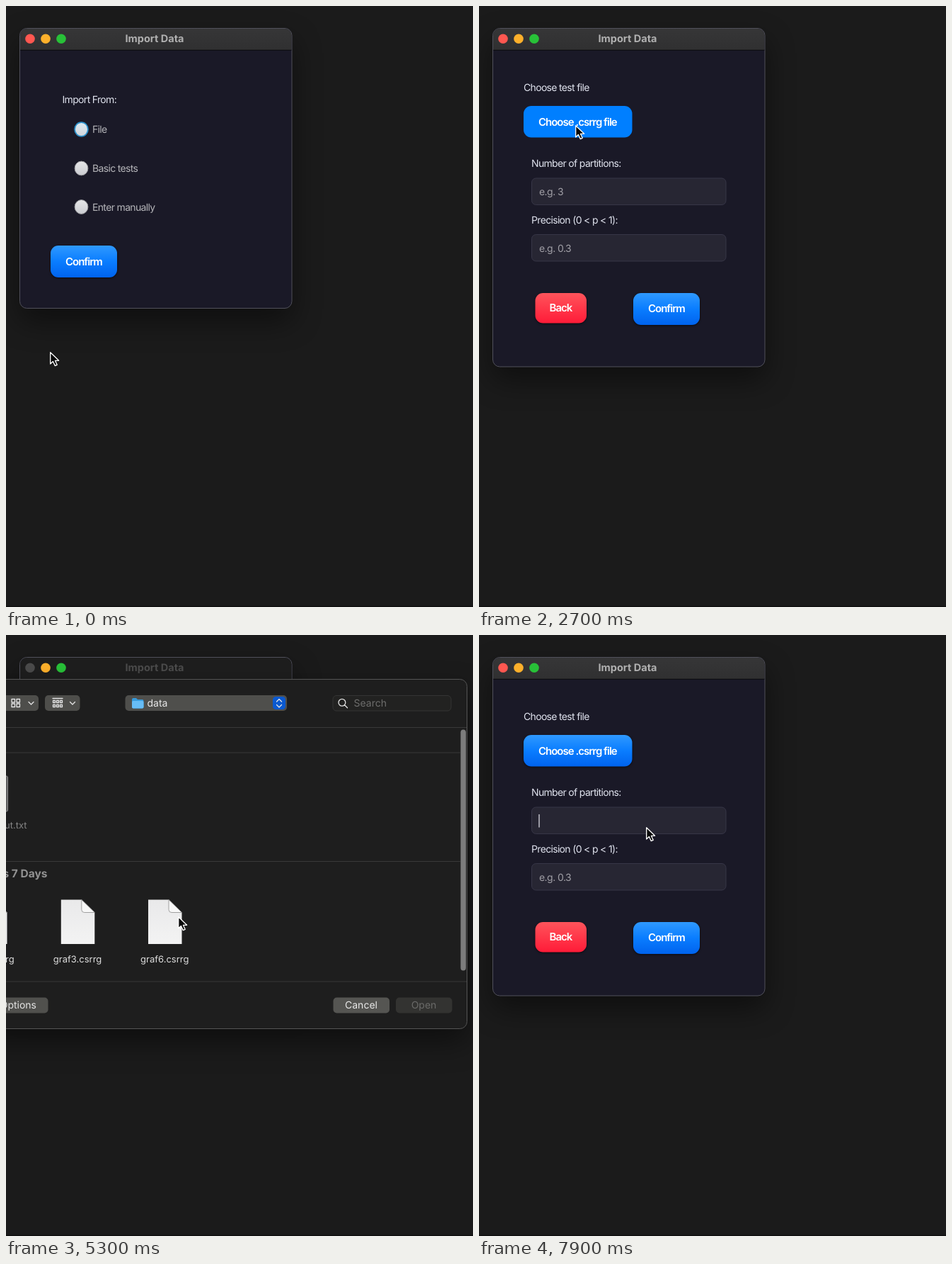
Recreate the animation shown at these times as an HTML page. Size 660 by 848 pixels, loop 8 s.

```html
<!DOCTYPE html>
<html lang="en">
<head>
<meta charset="utf-8">
<title>Import Data</title>
<style>
  html, body { margin: 0; width: 100%; height: 100%; overflow: hidden; background: #1b1b1b; }
  svg { display: block; width: 660px; height: 848px; }
  text { font: 14px Inter, "Open Sans", sans-serif; text-rendering: geometricPrecision; }
  .title { font-weight: 700; font-size: 14.5px; }
  .label { fill: #e0e3ee; letter-spacing: -.67px; }
  .option, .hint { fill: #b4b4b8; letter-spacing: -.66px; }
  .hint { fill: #a09fa6; letter-spacing: -.55px; }
  .btn { fill: #fff; font-weight: 600; font-size: 15px; letter-spacing: -1px; }
  .file { font-size: 13px; fill: #dedede; }
  .end { text-anchor: end; }
  .mid { text-anchor: middle; }
  .section { font-weight: 700; font-size: 15.5px; fill: #929292; }
  .line { stroke: #393939; }
  .icon { fill: none; stroke: #e4e4e4; stroke-width: 1.3; stroke-linecap: round; stroke-linejoin: round; }
  .shadow { filter: drop-shadow(0 1px 1.5px rgba(0,0,0,.6)); }
  .deep { filter: drop-shadow(0 18px 20px rgba(0,0,0,.45)); }
</style>
</head>
<body>
<svg id="stage" viewBox="0 0 660 848"></svg>
<script>
const stage = document.getElementById('stage');
const rect = (x, y, w, h, r, fill, more = '') =>
  `<rect x="${x}" y="${y}" width="${w}" height="${h}" rx="${r}" fill="${fill}" ${more}/>`;
const text = (x, y, s, cls = '', fill = '') =>
  `<text x="${x}" y="${y}" class="${cls}" ${fill && `style="fill:${fill}"`}>${s}</text>`;
const circle = (x, y, r, fill, more = '') => `<circle cx="${x}" cy="${y}" r="${r}" fill="${fill}" ${more}/>`;
const icon = d => `<path class="icon" d="${d}"/>`;
const gradient = (id, ...stops) => `<linearGradient id="${id}" x2="0" y2="1">${stops.map((c, i) =>
  `<stop offset="${i / (stops.length - 1)}" stop-color="${c}"/>`).join('')}</linearGradient>`;
const group = (id, body) => `<g id="${id}">${body}</g>`;

const button = (x, y, w, h, s, tx, ty, fill = 'blue', id = '') =>
  rect(x, y, w, h, 11, `url(#${fill})`, `class="shadow" ${id && `id="${id}"`}`) + text(tx, ty, s, 'btn');
const radio = (y, s, focus) =>
  `<ellipse cx="106.5" cy="${y}" rx="9.4" ry="9.9" fill="url(#${focus ? 'focus' : 'knob'})" stroke="${focus ? '#2b8fc9' : '#98989c'}" stroke-width="${focus ? 1.8 : 1}"/>` +
  text(122, y + 5, s, 'option');
const field = y => rect(74.5, y, 274.5, 37.5, 6, '#272633', 'stroke="#373647"');
const page = (x, y, s) =>
  `<path d="M${x} ${y}h29l18.500 18v44.500h-47.500z" fill="url(#paper)"/>` +
  `<path d="M${x + 29} ${y}v14q0 4 4 4h14.500z" fill="#f8f8f8" stroke="#8c8c8c" stroke-width=".8"/>` +
  text(x + 23.3, y + 88, s, 'file mid');
const chevron = x => icon(`M${x - 3.500} 94.500l3.500 3.500 3.500-3.500`);

const frame = `
  ${rect(19.5, 31.5, 384.5, 395, 10, '#1a1927', 'id="body" class="deep" stroke="#50505a"')}
  <path id="bar" d="M20 62V41.500a9.500 9.500 0 0 1 9.500-9.500H394a9.500 9.500 0 0 1 9.500 9.500V62z" fill="url(#chrome)"/>
  <path d="M20 62.300H403.500" stroke="#0b0b0d"/>
  ${circle(34, 46.3, 6.8, '#ff5750', 'id="red"')}
  ${circle(56, 46.3, 6.8, '#fdb02b')}
  ${circle(78, 46.3, 6.8, '#28c138')}
  <g id="caption">${text(168.5, 50.8, 'Import Data', 'title')}</g>`;

const source = text(79.5, 137, 'Import From:', 'label') +
  radio(174, 'File', true) + circle(106.5, 174, 3.8, '#303034', 'id="dot"') +
  radio(229, 'Basic tests') + radio(283.5, 'Enter manually') +
  button(63, 338, 94, 45, 'Confirm', 84, 365.7, 'blue', 'confirm');

const form = text(63, 120.3, 'Choose test file', 'label') +
  button(63, 141, 153.5, 44.5, 'Choose .csrrg file', 84, 168.8, 'blue', 'choose') +
  text(74, 227.3, 'Number of partitions:', 'label') + field(243) +
  group('hint', text(85, 267, 'e.g. 3', 'hint')) +
  `<path id="caret" d="M85 253V271.500" stroke="#e8e8ee" stroke-width="1.2"/>` +
  text(74, 306.7, 'Precision (0 &lt; p &lt; 1):', 'label') + field(322.5) +
  text(85, 346.5, 'e.g. 0.3', 'hint') +
  button(79.5, 405, 72.5, 42.5, 'Back', 99.5, 431, 'danger') +
  button(218, 405, 94, 45, 'Confirm', 239, 432.4);

const squares = [8, 15].map(x => [90.5, 97].map(y => `M${x} ${y}h4.500v4.500h-4.500z`).join('')).join('');
const cells = [66.5, 71.5, 76.5].map(x => [92.5, 98.5].map(y => `M${x} ${y}h3v3h-3z`).join('')).join('');

const dialog = `
  ${rect(-120, 62.5, 771.5, 493, 10, '#1e1e1e', 'class="deep" stroke="#555"')}
  <path class="line" d="M0 130.500H651M0 166H642M0 319.500H642M0 489H651"/>
  ${rect(-20, 85, 66, 22, 5, '#4e4e4b')}${icon(squares)}${chevron(35.5)}
  ${rect(55, 85, 49.5, 22, 5, '#4e4e4b')}${icon('M66 89.500h14' + cells)}${chevron(94)}
  ${rect(168.5, 85, 228.5, 22, 5, '#4f4f4c')}
  <path d="M178 91q0-2 2-2h4l2 2h6.500q2 0 2 2v8.500q0 2-2 2h-12.500q-2 0-2-2z" fill="#379bdc"/>
  ${rect(178, 93, 16.5, 10.5, 1.8, '#67bdf6')}
  ${text(199.5, 100.7, 'data', '', '#e8e8e8')}
  ${rect(377, 87, 18, 18, 4.5, '#0b59d0')}${icon('M382.500 94l3.500-3.500 3.500 3.500M382.500 98.500l3.500 3.500 3.500-3.500')}
  ${rect(462, 85.5, 167, 21.5, 5, '#222221', 'stroke="#353534"')}
  ${icon('M479.800 95.200a4.900 4.900 0 1 1-9.800 0a4.900 4.900 0 1 1 9.800 0M478.500 98.800l4 4')}
  ${text(491.5, 101.3, 'Search', '', '#6d6d6c')}
  ${rect(642.5, 133.5, 7.5, 340, 3.8, '#7c7c7c')}
  ${rect(-45, 199, 47.5, 50, 2, '#606060', 'stroke="#8a8a8a"')}
  ${text(29.5, 273, 'output.txt', 'file end', '#858585')}
  ${text(58.5, 341.5, 'Previous 7 Days', 'section end')}
  ${group('pick', rect(189, 367, 71, 75, 5, '#3a3a3a') + rect(186, 447, 76, 18, 4, '#0b59d0'))}
  ${page(-46, 373.5, 'graf2.csrrg')}${page(77.8, 373.5, 'graf3.csrrg')}${page(201, 373.5, 'graf6.csrrg')}
  ${rect(-60, 511.5, 119.5, 22, 5, '#50504d')}${text(43, 527.3, 'Show Options', 'end', '#e4e4e4')}
  ${rect(462.5, 511.5, 79.5, 22, 5, '#555552')}${text(502, 527.3, 'Cancel', 'mid', '#e8e8e8')}
  ${rect(551, 511.5, 79.5, 22, 5, '#333331', 'id="open"')}
  <g id="openText">${text(590.5, 527.3, 'Open', 'mid')}</g>`;

const arrow = '<path d="M.700 .700V17l3.700-3.500 2.900 6.100 2.900-1.300-2.800-6H12.600z" fill="#080808" stroke="#fff" stroke-width="1.3" stroke-linejoin="round"/>';
const hand = `<path d="M.500 3.500q1-2 2.500-.300l3 4.300q1-1.500 2.300 0q1.200-1.200 2.400.200q1.800-.700 2.200 1l.700 5-1.300 2.500v2.300H5.700l-.500-2-5-3.600q-1.200-1.600.800-2l2 .800z" fill="#fff" stroke="#111" stroke-width="1"/>
  <path d="M7 12.500v3M9.200 12.500v3M11.300 12.300v3" stroke="#222" stroke-width=".8"/>`;

stage.innerHTML = '<defs>' +
  gradient('chrome', '#363637', '#303031') +
  gradient('blue', '#2f99ff', '#0a7dff', '#0063ee') +
  gradient('danger', '#ff545b', '#ff1b38') +
  gradient('knob', '#e6e6e8', '#cbccd1') +
  gradient('focus', '#dceaf2', '#d2d5da') +
  gradient('paper', '#e9e9ea', '#f3f3f3') + '</defs>' +
  rect(0, 846.5, 660, 1.5, 0, '#101010') + frame +
  group('source', source) + group('form', form) + group('dialog', dialog) +
  group('cursor', group('arrow', arrow) + group('hand', hand));

const $ = id => document.getElementById(id);
const show = (id, on) => $(id).style.display = on ? '' : 'none';
const set = (id, key, value) => $(id).setAttribute(key, value);

// Pointer path: time, x, y
const path = [
  [0, 62, 488], [400, 84, 350], [700, 105, 178], [900, 106, 173], [1300, 121, 361],
  [2000, 121, 361], [2700, 136, 168], [3600, 133, 171], [3800, 120, 190],
  [4100, 20, 283], [4500, 20, 283], [5200, 243, 397], [6100, 243, 397],
  [6900, 236, 271], [8000, 236, 271]
];
function pointer(t) {
  const i = path.findIndex(p => p[0] > t);
  const [a, b] = [path[i - 1], path[i]];
  const k = (t - a[0]) / (b[0] - a[0]), e = k * k * (3 - 2 * k);
  return [a[1] + (b[1] - a[1]) * e, a[2] + (b[2] - a[2]) * e];
}
function hover(id, on) {
  set(id, 'fill', on ? '#007fff' : 'url(#blue)');
  set(id, 'class', on ? '' : 'shadow');
}

function draw(now) {
  const t = Math.floor(now % 8000 / 100) * 100; // ten steps per second
  const during = (a, b) => t >= a && t < b;
  const second = t >= 1800, sheet = during(3800, 5700), picked = t >= 5400;
  const focused = t >= 6900;

  show('source', !second);
  show('form', second);
  show('dialog', sheet);
  show('dot', t >= 800);
  hover('confirm', during(1300, 1800));
  hover('choose', during(2600, 6200));

  set('body', 'height', second ? 477.5 : 395);
  set('bar', 'fill', sheet ? '#1e1e1e' : 'url(#chrome)');
  set('red', 'fill', sheet ? '#4b4b4b' : '#ff5750');
  set('caption', 'fill', sheet ? '#4c4c4c' : '#b0b0b0');

  show('pick', picked);
  set('open', 'fill', picked ? '#0b59d0' : '#333331');
  set('openText', 'fill', picked ? '#fff' : '#6b6b69');

  show('hint', !focused);
  show('caret', focused && (t - 6900) % 1000 < 500);

  const pressing = during(1300, 1800) || during(5800, 6200);
  show('hand', pressing);
  show('arrow', !pressing);
  const [x, y] = pointer(t);
  set('cursor', 'transform', `translate(${x} ${y})`);
}

const start = performance.now();
(function tick() {
  draw(performance.now() - start);
  requestAnimationFrame(tick);
})();
</script>
</body>
</html>
```
